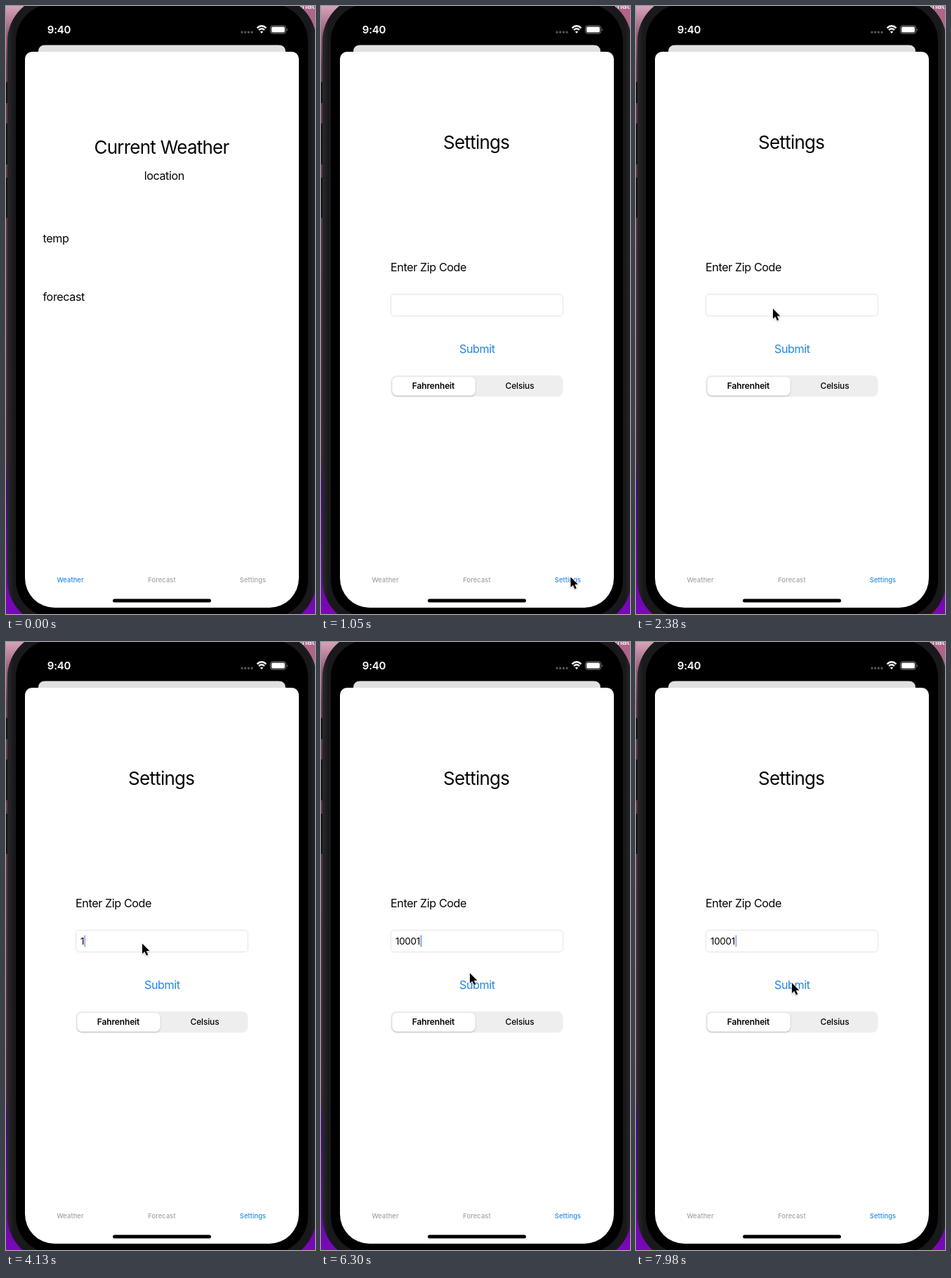
Animation, 440 px wide and 864 px high, one loop 8 s. Source, as an HTML page:

```html
<!DOCTYPE html>
<html lang="en">
<head>
<meta charset="utf-8">
<title>Weather app</title>
<style>
  html, body { margin: 0; width: 100%; height: 100%; overflow: hidden; background: #000; }
  svg { display: block; width: 440px; height: 864px; }
  text { font-family: Inter, "Liberation Sans", sans-serif; font-size: 16.2px; letter-spacing: -.42px; fill: #050505; }
  .mid { text-anchor: middle; }
  .title { font-size: 26px; letter-spacing: -.75px; }
  .seg { font-size: 12px; font-weight: 600; letter-spacing: -.15px; }
  .tab { font-size: 9.3px; font-weight: 500; letter-spacing: .1px; fill: #a2a2a2; }
  .tab.on { fill: #2689ea; }
  #zip { font-size: 13.5px; letter-spacing: -.35px; }
  #submit { fill: #2284e4; }
</style>
</head>
<body>
<svg viewBox="0 0 440 864">
  <defs>
    <linearGradient id="wall" x2="0" y2="1">
      <stop offset="0" stop-color="#d5a3b9"/>
      <stop offset=".045" stop-color="#9c5d7b"/>
      <stop offset=".1" stop-color="#683a50"/>
      <stop offset=".75" stop-color="#4b2439"/>
      <stop offset=".79" stop-color="#46097f"/>
      <stop offset="1" stop-color="#7908b9"/>
    </linearGradient>
    <linearGradient id="rim">
      <stop offset="0" stop-color="#29292b"/>
      <stop offset=".02" stop-color="#19191b"/>
      <stop offset=".98" stop-color="#19191b"/>
      <stop offset="1" stop-color="#29292b"/>
    </linearGradient>
    <filter id="soft" x="-30%" y="-30%" width="160%" height="160%">
      <feDropShadow dx="0" dy="1" stdDeviation="1" flood-opacity=".28"/>
    </filter>
  </defs>

  <!-- desktop and phone -->
  <rect width="440" height="864" fill="url(#wall)"/>
  <path d="M415 0H440V45Z" fill="#b06488"/>
  <text x="418" y="3.5" style="font-size:12px;font-weight:600;fill:#eee">that</text>
  <path d="M0 108H3V138H0ZM0 167H3V225H0ZM0 244H3V301H0Z" fill="#111"/>
  <rect x="2" y="-14" width="440" height="894" rx="64" fill="url(#rim)"/>
  <rect x="14" y="-3" width="416" height="872" rx="53"/>

  <!-- status bar -->
  <text class="mid" x="75.5" y="38.8" style="font-size:15px;font-weight:600;letter-spacing:-.2px;fill:#fff">9:40</text>
  <path d="M336 37.2H352" stroke="#555" stroke-width="3.4" stroke-linecap="round" stroke-dasharray="0 4.7"/>
  <g fill="none" stroke="#fff" stroke-width="2.4">
    <path d="M357.5 31.3Q364 25.3 370.5 31.3M360 34.2Q364 30.5 368 34.2"/>
    <path d="M364 39L361.8 36.6Q364 34.8 366.2 36.6Z" fill="#fff" stroke="none"/>
  </g>
  <rect x="376.5" y="28" width="22" height="11" rx="3.2" fill="none" stroke="#888"/>
  <rect x="378" y="29.5" width="19" height="8" rx="1.8" fill="#fff"/>
  <path d="M400 31.5Q401.8 33.5 400 35.5Z" fill="#888"/>

  <!-- sheet -->
  <path d="M46 70V65Q46 55.5 56 55.5H388Q398 55.5 398 65V70Z" fill="#e1e1e1"/>
  <path d="M27 75A10 10 0 0 1 37 65H407A10 10 0 0 1 417 75V813A42 42 0 0 1 375 855H69A42 42 0 0 1 27 813Z" fill="#fff"/>
  <rect x="152" y="842.5" width="140" height="5" rx="2.5"/>

  <g id="weather">
    <text class="mid title" x="221.5" y="209.5">Current Weather</text>
    <text class="mid" x="225.3" y="247.3">location</text>
    <text x="52.5" y="336">temp</text>
    <text x="52.5" y="418.5">forecast</text>
  </g>

  <g id="settings">
    <text class="mid title" x="221.2" y="203">Settings</text>
    <text x="99" y="376.7">Enter Zip Code</text>
    <rect x="99.5" y="409.5" width="245" height="31" rx="4.5" fill="#fff" stroke="#e5e5e5"/>
    <text id="zip" x="106" y="430"></text>
    <rect id="caret" y="416.5" width="1.9" height="17" rx=".9" fill="#5b83e6"/>
    <text id="submit" class="mid" x="222.3" y="493">Submit</text>
    <rect x="99.5" y="525" width="245" height="30" rx="8" fill="#eee"/>
    <rect x="101.5" y="527" width="118" height="26.5" rx="6.5" fill="#fff" filter="url(#soft)"/>
    <text class="mid seg" x="160" y="544.3">Fahrenheit</text>
    <text class="mid seg" x="283" y="544.3" style="font-weight:500">Celsius</text>
  </g>

  <text class="mid tab" x="91.5" y="819">Weather</text>
  <text class="mid tab" x="222" y="819">Forecast</text>
  <text class="mid tab" x="351.5" y="819">Settings</text>

  <path id="mouse" d="M0 0V14.6L3.4 11.4 5.9 17 8.3 16 5.9 10.5H10.4Z" stroke="#fff" stroke-width="1.2" stroke-linejoin="round" paint-order="stroke" filter="url(#soft)"/>
</svg>
<script>
const LOOP = 8000, TICK = 70, BLINK = 1050;
const el = id => document.getElementById(id);
const tabs = document.querySelectorAll(".tab");
const clamp = v => Math.max(0, Math.min(1, v));
const ramp = (t, from, to) => clamp((t - from) / (to - from));
const ease = p => p * p * (3 - 2 * p);

// pointer path: time, x, y
const path = [
  [0, 262, 872], [560, 340, 820], [700, 340, 820], [910, 355.5, 811.5],
  [1540, 355.5, 811.5], [2100, 195, 430], [2520, 195, 430], [2660, 194, 428.5],
  [5670, 194, 428.5], [6090, 207, 472], [6160, 207, 471], [6300, 212, 470.5],
  [6580, 223, 481], [6720, 223, 481], [7000, 223, 488], [7140, 223, 488], [7420, 222, 484.5]
];
const keyTimes = [3570, 4200, 4550, 4970, 5320];
const caretX = [106, 111.3, 119.5, 127.8, 136, 141.5];

function pointer(t) {
  const i = path.findIndex(k => k[0] > t);
  if (i < 0) return path[path.length - 1].slice(1);
  const [a, b] = [path[i - 1], path[i]];
  const p = i === 1 ? ramp(t, a[0], b[0]) : ease(ramp(t, a[0], b[0]));
  return [1, 2].map(n => a[n] + (b[n] - a[n]) * p);
}

function caretAlpha(t, since) {
  if (t < 2660) return 0;
  const age = (t - since) % BLINK;
  return 1 - ramp(age, 490, 700) + ramp(age, 900, 1000);
}

function draw(t) {
  const page = t >= 1050 ? 2 : 0;
  el("weather").style.display = page ? "none" : "";
  el("settings").style.display = page ? "" : "none";
  tabs.forEach((tab, i) => tab.classList.toggle("on", i === page));

  const typed = keyTimes.filter(k => k <= t).length;
  el("zip").textContent = "10001".slice(0, typed);
  el("caret").setAttribute("x", caretX[typed]);
  el("caret").setAttribute("opacity", caretAlpha(t, typed ? keyTimes[typed - 1] : 2660));

  const press = ramp(t, 6720, 6860) - ramp(t, 7140, 7420);
  el("submit").setAttribute("opacity", 1 - .8 * press);
  el("mouse").setAttribute("transform", `translate(${pointer(t)})`);
}

const start = performance.now();
function frame() {
  const t = Math.max(0, performance.now() - start) % LOOP;
  draw(t - t % TICK);
  requestAnimationFrame(frame);
}
draw(0);
requestAnimationFrame(frame);
</script>
</body>
</html>
```
